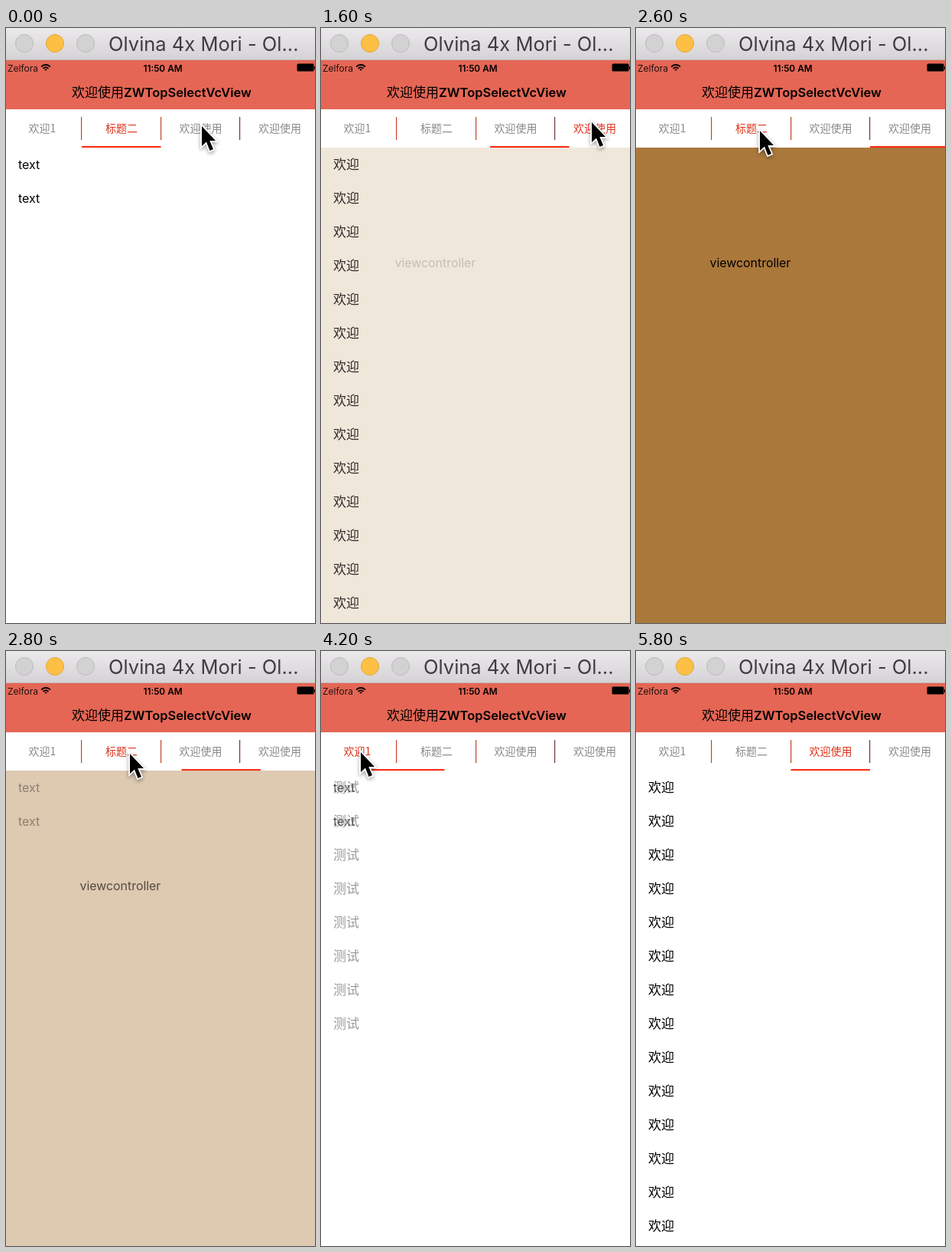
An HTML page with a canvas for the animation above (6000 ms loop, 404 px wide and 776 px high).

```html
<!DOCTYPE html>
<html lang="zh-CN">
<head>
<meta charset="utf-8">
<style>
html, body { margin: 0; width: 100%; height: 100%; overflow: hidden; background: #fff }
canvas { display: block }
</style>
</head>
<body>
<canvas id="stage" width="404" height="776"></canvas>
<script>
const ctx = document.getElementById('stage').getContext('2d');
const LOOP = 6000, STEP = 200, FADE = 500;
const FONT = 'Inter, "Noto Sans CJK SC", "Noto Sans CJK", sans-serif';
const CJK = '"Noto Sans CJK SC", "Noto Sans CJK", sans-serif';
const RED = '#f92b10', WHITE = '#fff';
const TAB_W = 103.5, TAB_X = -4.5;

const tabs = ['欢迎1', '标题二', '欢迎使用', '欢迎使用'];
const pages = [
  { bg: WHITE, label: '测试', rows: 8, size: 17 },
  { bg: WHITE, label: 'text', rows: 2, size: 16 },
  { bg: WHITE, label: '欢迎', rows: 14, size: 17 },
  { bg: '#ab783b', label: 'viewcontroller', rows: 1, size: 15.9, x: 96.5, y: 312 }
];
// [time, tab]
const clicks = [[-1000, 1], [300, 2], [1465, 3], [2594, 1], [3985, 0], [5000, 2]];
// [start, end, x, y] of each pointer move
const moves = [
  [-1, 0, 256, 128], [750, 1300, 354, 123], [1950, 2500, 162, 134],
  [3350, 3900, 52, 132], [4350, 4900, 256, 128], [5350, 5750, 262, -50]
];

const ease = p => { p = Math.min(1, Math.max(0, p)); return p * p * (3 - 2 * p); };
const mix = (a, b, p) => a + (b - a) * p;

function box(x, y, w, h, color) {
  ctx.fillStyle = color;
  ctx.fillRect(x, y, w, h);
}

function text(s, x, y, size, { color = '#000', weight = 400, align = 'left', font = FONT } = {}) {
  ctx.font = `${weight} ${size}px ${font}`;
  ctx.textAlign = align;
  ctx.fillStyle = color;
  ctx.fillText(s, x, y);
}

function drawWindowBar() {
  const g = ctx.createLinearGradient(0, 0, 0, 42);
  g.addColorStop(0, '#ebe9eb');
  g.addColorStop(1, '#d4d2d4');
  box(0, 0, 404, 42, g);
  box(0, 41, 404, 1, '#c4b8b8');
  [['#d3d2d3', '#bcbabc'], ['#fdc044', '#e3a63c'], ['#d3d2d3', '#bcbabc']].forEach(([fill, line], i) => {
    ctx.beginPath();
    ctx.arc(24 + 40 * i, 20, 11.5, 0, 7);
    ctx.fillStyle = fill;
    ctx.fill();
    ctx.strokeStyle = line;
    ctx.lineWidth = 1;
    ctx.stroke();
  });
  text('Olvina 4x Mori - Ol...', 134, 30, 25.5, { color: '#403c40' });
}

function drawHeader() {
  box(0, 42, 404, 64, '#e56655');
  text('Zelfora', 2, 57, 12, { color: '#201311' });
  ctx.strokeStyle = '#000';
  ctx.lineWidth = 1.8;
  for (const r of [1.5, 4.7, 8]) {
    ctx.beginPath();
    ctx.arc(52, 56, r, -Math.PI * 0.76, -Math.PI * 0.24);
    ctx.stroke();
  }
  text('11:50 AM', 205, 57, 11.8, { weight: 600, align: 'center' });
  ctx.fillStyle = '#000';
  ctx.beginPath();
  ctx.roundRect(380.5, 46.5, 22, 10, 1.5);
  ctx.fill();
  box(403, 50, 1, 4, '#000');
  text('欢迎使用', 86, 90, 17, { weight: 500, font: CJK });
  text('ZWTopSelectVcView', 154, 90, 16.5, { weight: 600 });
}

function drawTabs(active, lineAt) {
  box(0, 106, 404, 50, WHITE);
  tabs.forEach((label, i) => {
    const color = i === active ? '#e0341c' : '#8a8a8a';
    text(label, 47.5 + TAB_W * i, 136, 14, { color, weight: 300, align: 'center', font: CJK });
  });
  [98, 202, 305].forEach((x, i) => box(x, 116, 1.2, 30, i < 2 ? '#c8402c' : '#6e3a38'));
  box(TAB_X + TAB_W * lineAt, 154, TAB_W, 2, RED);
}

function drawPages(from, to, p) {
  box(0, 156, 404, 620, WHITE);
  const layers = [[pages[from], 1 - p], [pages[to], p]];
  for (const [page, alpha] of layers) {
    ctx.globalAlpha = alpha;
    box(0, 156, 404, 620, page.bg);
  }
  for (const [{ label, rows, size, x = 16, y = 184 }, alpha] of layers) {
    ctx.globalAlpha = alpha;
    for (let i = 0; i < rows; i++) text(label, x, y + 44 * i, size);
  }
  ctx.globalAlpha = 1;
}

function drawPointer(t) {
  let x = 0, y = 0;
  for (const [start, end, toX, toY] of moves) {
    const p = ease((t - start) / (end - start));
    x = mix(x, toX, p);
    y = mix(y, toY, p);
  }
  const shape = new Path2D('M0 0V26L6 20.5L10.5 32L15 30L10.3 19H18Z');
  ctx.save();
  ctx.translate(x, y);
  ctx.shadowColor = 'rgba(0,0,0,.4)';
  ctx.shadowBlur = 5;
  ctx.shadowOffsetY = 2;
  ctx.strokeStyle = WHITE;
  ctx.lineWidth = 3.5;
  ctx.stroke(shape);
  ctx.shadowColor = 'transparent';
  ctx.fillStyle = '#000';
  ctx.fill(shape);
  ctx.restore();
}

function draw() {
  const t = Math.floor(performance.now() % LOOP / STEP) * STEP;
  const last = clicks.findLastIndex(c => c[0] <= t);
  const [start, to] = clicks[last];
  const from = last ? clicks[last - 1][1] : to;
  const p = ease((t - start) / FADE);
  drawPages(from, to, p);
  drawTabs(to, mix(from, to, p));
  drawHeader();
  drawWindowBar();
  drawPointer(t);
  requestAnimationFrame(draw);
}
draw();
</script>
</body>
</html>
```
